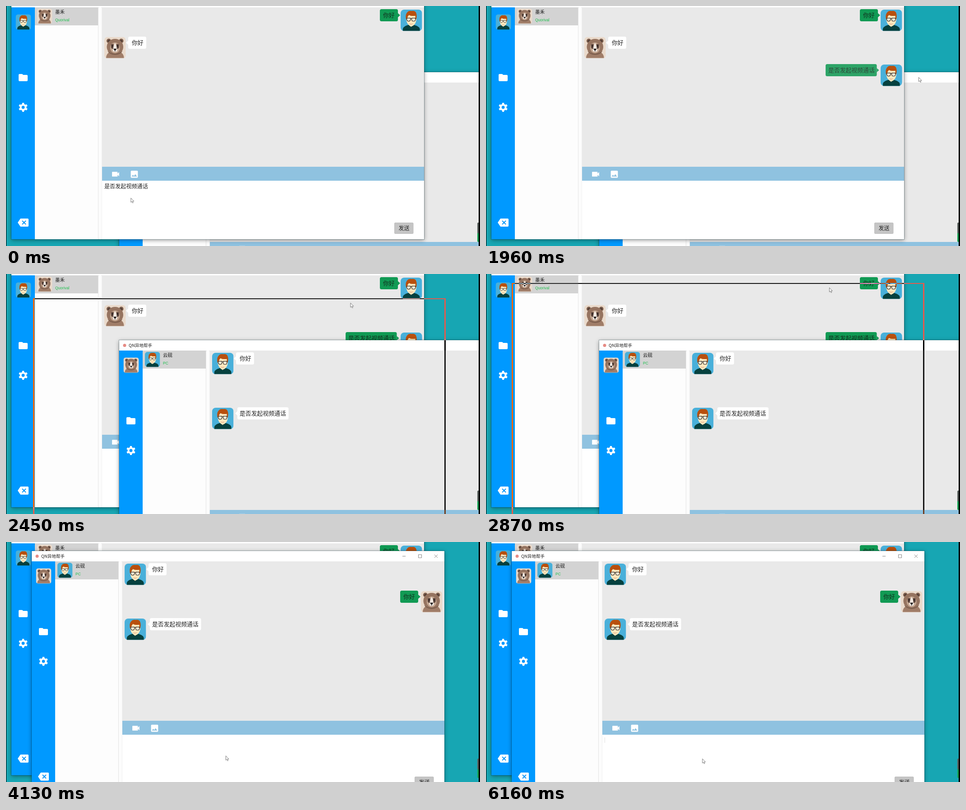
These frames come from a looping animation (1051x533 px, 6230 ms). An HTML page:

```html
<!DOCTYPE html>
<html lang="zh-CN">
<head>
<meta charset="utf-8">
<title>Chat windows</title>
<style>
  html, body { margin: 0; width: 100%; height: 100%; overflow: hidden; }
  #stage { position: relative; width: 1051px; height: 533px; overflow: hidden; isolation: isolate; background: #17a6b3; }
  #stage > * { position: absolute; }
  .win { left: 0; top: 0; width: 915px; height: 538px; background: #fff;
    box-shadow: 0 0 0 1px rgba(0, 40, 50, .3), 0 2px 9px rgba(0, 0, 0, .4);
    font-family: "Noto Sans CJK SC", "Noto Sans CJK", "Noto Sans", sans-serif; }
  .status { font-family: "Liberation Sans", sans-serif; }
  #a { transform: translate(12px, -20px); z-index: 2; }
  #b { animation: raise 6230ms step-end infinite; }
  #frame { left: 0; top: 0; width: 915px; height: 538px; box-sizing: border-box; z-index: 5;
    border: 3px solid #fff; border-top-width: 2px; mix-blend-mode: difference;
    animation: drag 6230ms linear infinite, outline 6230ms step-end infinite; }
  #cursor { left: 0; top: 0; width: 10px; height: 14px; overflow: visible; z-index: 6; animation: point 6230ms linear infinite; }
  .edge { top: 0; height: 533px; background: #000; z-index: 8; }
  #widget { left: 1045px; top: 481px; width: 3px; height: 43px; z-index: 4; border-radius: 2px 0 0 2px;
    background: linear-gradient(#5c6360 52%, #12a552 58%); }

  #a .draft { animation: draft 6230ms step-end infinite; }
  #a .sent { animation: show 6230ms step-end infinite; }
  #a .fade { animation: fade 6230ms linear infinite; }
  #a .send { animation: press 6230ms step-end infinite; }
  #b .caret { animation: caret 6230ms step-end infinite; }

  @keyframes raise {
    0% { transform: translate(251px, 147px); z-index: 1; }
    32.6% { transform: translate(251px, 147px); z-index: 3; }
    58.43%, 100% { transform: translate(57px, 20px); z-index: 3; }
  }
  @keyframes outline { 0% { opacity: 0; } 33.7% { opacity: 1; } 58.43%, 100% { opacity: 0; } }
  @keyframes drag {
    0%, 33.7% { transform: translate(251px, 147px); }
    39.33% { transform: translate(60px, 54px); }
    44.94%, 100% { transform: translate(57px, 20px); }
  }
  @keyframes point {
    0%, 2.25% { transform: translate(276.5px, 426px); }
    4.49% { transform: translate(277px, 421px); }
    5.62% { transform: translate(297px, 416px); }
    7.87% { transform: translate(525px, 416px); }
    10.11% { transform: translate(783px, 419px); }
    11.24% { transform: translate(823px, 429px); }
    12.36% { transform: translate(843px, 450px); }
    13.48% { transform: translate(866px, 502px); }
    15.73%, 21.35% { transform: translate(869px, 493px); }
    24.08% { transform: translate(885px, 460px); }
    28.09% { transform: translate(974px, 205px); }
    30.5%, 32% { transform: translate(959px, 158px); }
    33.7% { transform: translate(955px, 157px); }
    39.33% { transform: translate(763.5px, 64px); }
    44.94%, 60.67% { transform: translate(761px, 30px); }
    61.8% { transform: translate(755px, 49px); }
    62.92% { transform: translate(613px, 303px); }
    64.04% { transform: translate(520px, 447px); }
    65.17% { transform: translate(512px, 456px); }
    66.29%, 96.63% { transform: translate(487px, 474.5px); }
    98.88%, 100% { transform: translate(479.5px, 481px); }
  }
  @keyframes draft { 0% { opacity: 1; } 16.85%, 100% { opacity: 0; } }
  @keyframes show { 0% { opacity: 0; } 16.85%, 100% { opacity: 1; } }
  @keyframes fade { 0%, 17% { opacity: 0; } 33.7%, 100% { opacity: 1; } }
  @keyframes press { 0% { fill: #c5c5c5; } 16.85% { fill: #a2a2a2; } 20.2%, 100% { fill: #c5c5c5; } }
  @keyframes caret { 0% { opacity: 0; } 75.28% { opacity: .6; } 80.9% { opacity: 0; } 86.52% { opacity: .6; } 96.63%, 100% { opacity: .15; } }
</style>
</head>
<body>
<svg width="0" height="0" style="position:absolute">
  <symbol id="man" viewBox="0 0 48 48">
    <rect width="48" height="48" rx="8" fill="#49b0da"/>
    <path d="M18 29h11v9l-5.500 4-5.500-4z" fill="#f3d3a4"/>
    <path d="M5 48v-5q1-6 13-9l5.500 5 5.500-5q13 3 14 9v5z" fill="#06413f"/>
    <path d="M13 15q0-7 11-7t11 7v9q-1 8-7 12-4 2-8 0-6-4-7-12z" fill="#ffe9bf"/>
    <path d="M12 22q-2-12 3-16 3-4 10-3 8-1 10 5 2 5 0 14l-2-1v-7q-10 1-14-2-4 3-4 9z" fill="#b8500e"/>
    <path d="M14 19h8v4q-1 3-4 3t-4-3zM25 19h8v4q0 3-4 3t-4-3zM22 20.500h3" fill="#fff3d8" stroke="#2c2b2a" stroke-width="1.200"/>
    <path d="M20 32q3.500 1.500 7 0" fill="none" stroke="#cf8a66"/>
  </symbol>
  <symbol id="bear" viewBox="0 0 48 48">
    <rect width="48" height="48" rx="7" fill="#eadacb"/>
    <path d="M4 47q0-10 9-14h22q9 4 9 14z" fill="#a07d68"/>
    <g fill="#80614f"><circle cx="10" cy="8.500" r="5"/><circle cx="38" cy="8.500" r="5"/></g>
    <g fill="#4d3b34"><circle cx="10.500" cy="9" r="2.800"/><circle cx="37.500" cy="9" r="2.800"/></g>
    <ellipse cx="24" cy="22" rx="18.500" ry="18" fill="#967460"/>
    <path d="M7 31q17 13 34 0-5 9-17 9T7 31z" fill="#7d5f4e"/>
    <ellipse cx="24" cy="24" rx="11" ry="12" fill="#c4a690"/>
    <path d="M24 13l5 10v8q-5 5-10 0v-8z" fill="#f3e9e1"/>
    <path d="M15 17q4-3 6 0l-1 9q-4 1-5-3zM33 17q-4-3-6 0l1 9q4 1 5-3z" fill="#5b443b"/>
    <circle cx="18.500" cy="20" r="1.200" fill="#161313"/><circle cx="29.500" cy="20" r="1.200" fill="#161313"/>
    <path d="M20.500 26h7l-2 4h-3z" fill="#1d1919"/>
    <path d="M24 30v3" stroke="#1d1919"/>
  </symbol>
  <symbol id="folder" viewBox="0 0 24 24"><path d="M10 4H4a2 2 0 0 0-2 2v12a2 2 0 0 0 2 2h16a2 2 0 0 0 2-2V8a2 2 0 0 0-2-2h-8z"/></symbol>
  <symbol id="gear" viewBox="-12 -12 24 24">
    <circle r="5.400" fill="none" stroke="#fff" stroke-width="4"/>
    <g id="teeth"></g>
  </symbol>
  <symbol id="erase" viewBox="0 0 24 24">
    <path d="M22 3H7q-1 0-1.600.9L0 12l5.400 8.100Q6 21 7 21h15a2 2 0 0 0 2-2V5a2 2 0 0 0-2-2z"/>
    <path d="M10 8l8 8m0-8l-8 8" stroke="#0c98f8" stroke-width="2"/>
  </symbol>
  <symbol id="video" viewBox="0 0 24 24"><path d="M17 10.500V7a1 1 0 0 0-1-1H4a1 1 0 0 0-1 1v10a1 1 0 0 0 1 1h12a1 1 0 0 0 1-1v-3.500l4 4v-11z"/></symbol>
  <symbol id="image" viewBox="0 0 24 24">
    <rect x="3" y="3" width="18" height="18" rx="2"/>
    <path d="M5 18l3.500-4.500 2.500 3 3.500-4.500L19 18z" fill="#8fc2e0"/>
  </symbol>
</svg>

<div id="stage">
  <svg id="a" class="win" viewBox="0 0 915 538"></svg>
  <svg id="b" class="win" viewBox="0 0 915 538"></svg>
  <div id="widget"></div>
  <div id="frame"></div>
  <svg id="cursor" viewBox="0 0 10 14"><path d="M.4.4v9.600l2.200-2 1.600 3.500 1.500-.7L4.200 7.400h2.900z" fill="#fff" stroke="#6d6d6d" stroke-width=".9"/></svg>
  <div class="edge" style="left:0;width:1px"></div>
  <div class="edge" style="left:1048px;width:3px"></div>
</div>

<script>
const HELLO = "你好", ASK = "是否发起视频通话";

const rect = (x, y, w, h, fill, more = "") => `<rect x="${x}" y="${y}" width="${w}" height="${h}" fill="${fill}" ${more}/>`;
const text = (x, y, size, str, fill = "#222", more = "") => `<text x="${x}" y="${y}" font-size="${size}" fill="${fill}" ${more}>${str}</text>`;
const icon = (id, x, y, size) => `<use href="#${id}" x="${x}" y="${y}" width="${size}" height="${size}" fill="#fff"/>`;

function message(row, who, mine, str, cls = "") {
  const y = 28 + 61 * row, long = str.length > 2;
  const w = long ? 113.5 : 40;
  const x = mine ? (long ? 741 : 817) : (long ? 262 : 259);
  const tx = mine ? (long ? 747 : 824) : 267;
  const fill = mine ? "#119a54" : "#fff";
  const edge = mine ? x + w : x, tip = mine ? edge + 5 : edge - 5;
  return `<g class="${cls && "sent"}">${icon(who, mine ? 863 : 206, y, 47.5)}
    <g class="${cls}">${rect(x, y - 1, w, 27, fill, 'rx="3.5"')}
    <path d="M${edge} ${y + 8}L${tip} ${y + 12.5}L${edge} ${y + 17}z" fill="${fill}"/>
    ${text(tx, y + 16.5, 12.85, str, mine ? "#12301f" : "#222")}</g></g>`;
}

function chatWindow(id, { me, peer, name, status, messages, extra }) {
  document.getElementById(id).innerHTML =
    `<circle cx="12" cy="11.500" r="3.500" fill="#e58a84"/>` +
    text(21, 15, 9.5, "QN异地帮手") +
    `<path d="M822 11.500h7M857.500 8h7v7h-7zM893 8l7 7m0-7l-7 7" fill="none" stroke="#666" stroke-width=".8"/>` +
    rect(0, 23, 52, 515, "#0099ff") +
    icon(me, 9.5, 38.5, 34) + icon("folder", 14, 167, 24) + icon("gear", 14, 233, 24) + icon("erase", 14, 489, 24) +
    rect(52, 23, 140, 515, "#fdfdfd") + rect(52, 23, 140, 40, "#d3d3d3") +
    icon(peer, 57, 26, 33.5) + text(97, 36.5, 10.5, name, "#111") +
    text(97, 54, 8.5, status, "#1fbf4e", 'class="status"') +
    rect(192, 23, 9, 515, "#e4e4e4") + rect(193, 23, 7.5, 515, "#fcfcfc", 'rx="2.5"') +
    rect(201, 23, 714, 354, "#e9e9e9") + rect(201, 377, 714, 31, "#8fc2e0") +
    icon("video", 220.5, 383, 21) + icon("image", 262, 383, 21) +
    messages +
    rect(849.5, 501.5, 41.5, 24, "#c5c5c5", 'class="send" rx="1.5" stroke="#b4b4b4" stroke-width=".8"') +
    text(858.5, 517.5, 12, "发送") + extra;
}

document.getElementById("teeth").innerHTML = [0, 60, 120, 180, 240, 300]
  .map(r => `<path d="M-2.600-6L-2-10h4l.6 4z" transform="rotate(${r})"/>`).join("");

chatWindow("a", {
  me: "man", peer: "bear", name: "墨禾", status: "Quorival",
  messages: message(0, "man", true, HELLO) + message(1, "bear", false, HELLO) + message(2, "man", true, ASK, "fade"),
  extra: text(206, 424.5, 12.1, ASK, "#222", 'class="draft"')
});
chatWindow("b", {
  me: "bear", peer: "man", name: "云砚", status: "PC",
  messages: message(0, "man", false, HELLO) + message(1, "bear", true, HELLO) + message(2, "man", false, ASK),
  extra: rect(206, 414, 1, 12, "#333", 'class="caret"')
});
</script>
</body>
</html>
```
